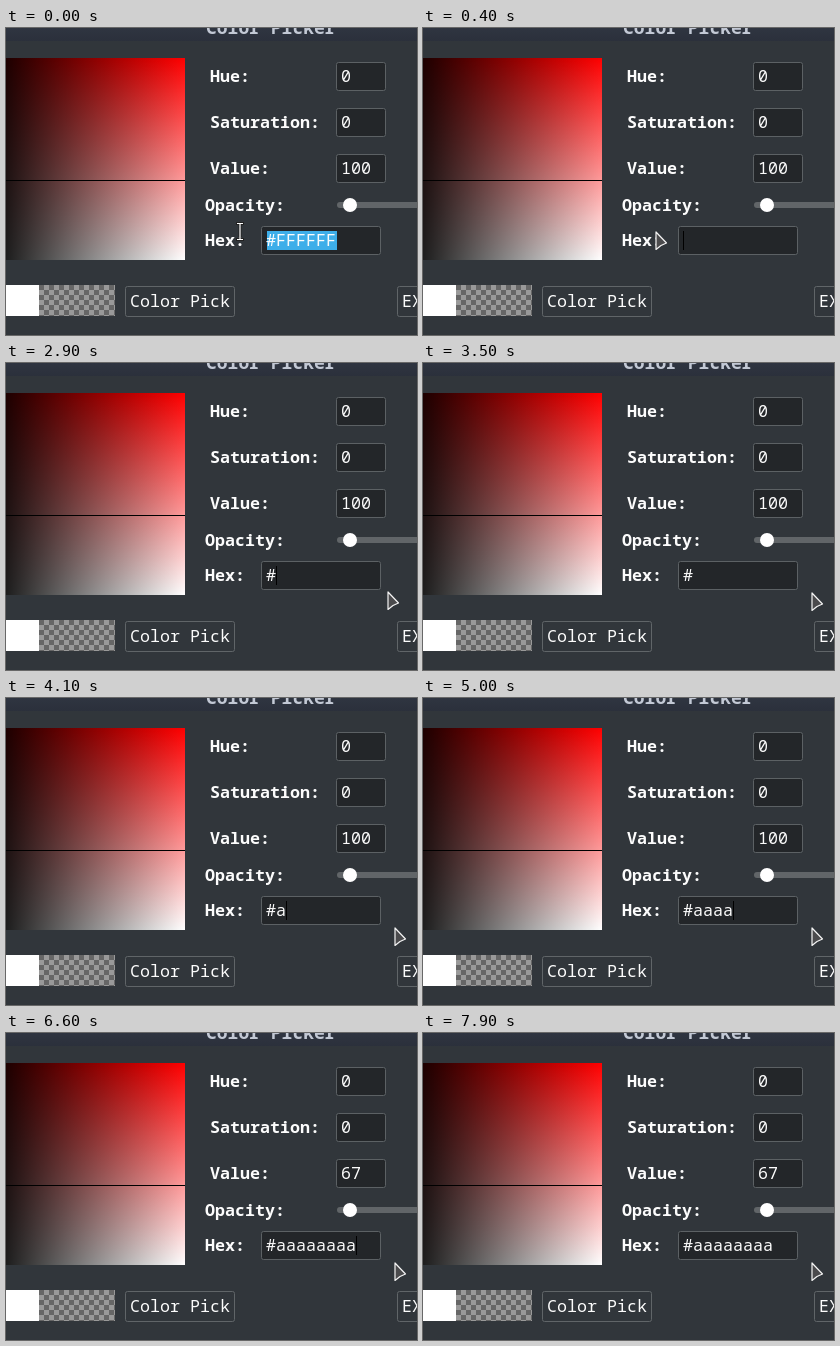
These frames come from a looping animation (411 px wide and 307 px high, 8000 ms). An HTML page:

```html
<!DOCTYPE html>
<html lang="en">
<head>
<meta charset="utf-8">
<title>Color picker</title>
<style>
html, body { margin: 0; width: 100%; height: 100%; overflow: hidden; background: #31363b; }
svg { display: block; }
text { font: 16.667px "Noto Sans Mono", "DejaVu Sans Mono", monospace; fill: #fcfcfc; white-space: pre; }
.label { font-weight: 700; }
.title { font-size: 18px; font-weight: 700; fill: #c3c9d5; }
.field { fill: #232629; stroke: #5c6164; }
.button { fill: #31363b; stroke: #606568; }
</style>
</head>
<body>
<svg width="411" height="307" viewBox="0 0 411 307">
  <defs>
    <linearGradient id="tint" x2="0" y2="1">
      <stop stop-color="#f00"/><stop offset="1" stop-color="#fff"/>
    </linearGradient>
    <linearGradient id="shade">
      <stop/><stop offset="1" stop-opacity="0"/>
    </linearGradient>
    <linearGradient id="bar" x2="0" y2="1">
      <stop stop-color="#2f3541"/><stop offset="1" stop-color="#2b303b"/>
    </linearGradient>
    <pattern id="checks" x="33" y="257" width="10" height="10" patternUnits="userSpaceOnUse">
      <path fill="#999" d="M0 0h10v10H0z"/>
      <path fill="#666" d="M0 0h5v5H0zM5 5h5v5H5z"/>
    </pattern>
  </defs>
  <path fill="#31363b" d="M0 0h411v307H0z"/>
  <path fill="url(#bar)" d="M0 0h411v13H0z"/>
  <text class="title" x="200" y="6">Color Picker</text>

  <rect x="-23" y="30" width="202" height="202" fill="url(#tint)"/>
  <rect x="-23" y="30" width="202" height="202" fill="url(#shade)"/>
  <path d="M0 152h179v1H0z"/>

  <path fill="#fff" d="M0 257h33v31H0z"/>
  <path fill="url(#checks)" d="M33 257h76v31H33z"/>

  <g class="label-group">
    <text class="label" x="204" y="54">Hue:</text>
    <text class="label" x="204" y="100">Saturation:</text>
    <text class="label" x="204" y="146">Value:</text>
    <text class="label" x="199" y="183">Opacity:</text>
    <text class="label" x="199" y="218">Hex:</text>
  </g>

  <rect class="field" x="330.5" y="34.5" width="49" height="28" rx="2"/>
  <rect class="field" x="330.5" y="80.5" width="49" height="28" rx="2"/>
  <rect class="field" x="330.5" y="126.5" width="49" height="28" rx="2"/>
  <rect class="field" x="255.5" y="198.5" width="119" height="28" rx="2"/>
  <text x="335" y="54">0</text>
  <text x="335" y="100">0</text>
  <text id="value" x="335" y="146"></text>

  <rect x="331" y="174" width="100" height="6" rx="3" fill="#616568"/>
  <circle cx="344" cy="177" r="7" fill="#fff"/>

  <rect id="selection" x="261" y="203" width="70" height="19" fill="#3daee9"/>
  <text id="hex" x="260" y="218"></text>
  <rect id="caret" y="203" width="1" height="19"/>

  <rect class="button" x="119.5" y="258.5" width="109" height="30" rx="2"/>
  <text x="124" y="279">Color Pick</text>
  <rect class="button" x="391.5" y="258.5" width="60" height="30" rx="2"/>
  <text x="396" y="279">EXIT</text>

  <path id="arrow" d="M1 1V18.5L6 14.5L11.5 12Z" fill="#4b4b4d" stroke="#f4f4f4" stroke-width="1.2" stroke-linejoin="round"/>
  <g id="beam" fill="none">
    <path d="M0 1.5H8M4 1V18M0 17.5H8" stroke="#222" stroke-width="3"/>
    <path d="M1 1.5H7M4 1V18M1 17.5H7" stroke="#fff" stroke-width="1.2"/>
  </g>
</svg>
<script>
const LOOP = 8000;
const typed = [2200, 4100, 4300, 4700, 5000, 5400, 5700, 6200, 6600];
const caretOff = [[0, 300], [1600, 2200], [3500, 4100], [7900, LOOP]];
// start time, pointer shape, x, y
const pointer = [
  [0, "beam", 230, 194],
  [400, "arrow", 232, 203],
  [2800, "beam", 322, 200],
  [2900, "arrow", 381, 228],
  [3000, "arrow", 388, 229]
];
const el = id => document.getElementById(id);
const show = (id, on) => el(id).setAttribute("visibility", on ? "visible" : "hidden");

function draw(t) {
  const selected = t < 300;
  const count = typed.filter(start => t >= start).length;
  el("hex").textContent = selected ? "#FFFFFF" : "#aaaaaaaa".slice(0, count);
  el("value").textContent = count === typed.length ? "67" : "100";
  el("caret").setAttribute("x", 260 + 10 * count);
  show("selection", selected);
  show("caret", !caretOff.some(([from, to]) => t >= from && t < to));

  const [, shape, x, y] = pointer.filter(([start]) => t >= start).pop();
  for (const id of ["arrow", "beam"]) show(id, id === shape);
  el(shape).setAttribute("transform", `translate(${x} ${y})`);
}

const begin = performance.now();
function tick() {
  draw((performance.now() - begin) % LOOP);
  requestAnimationFrame(tick);
}
tick();
</script>
</body>
</html>
```
